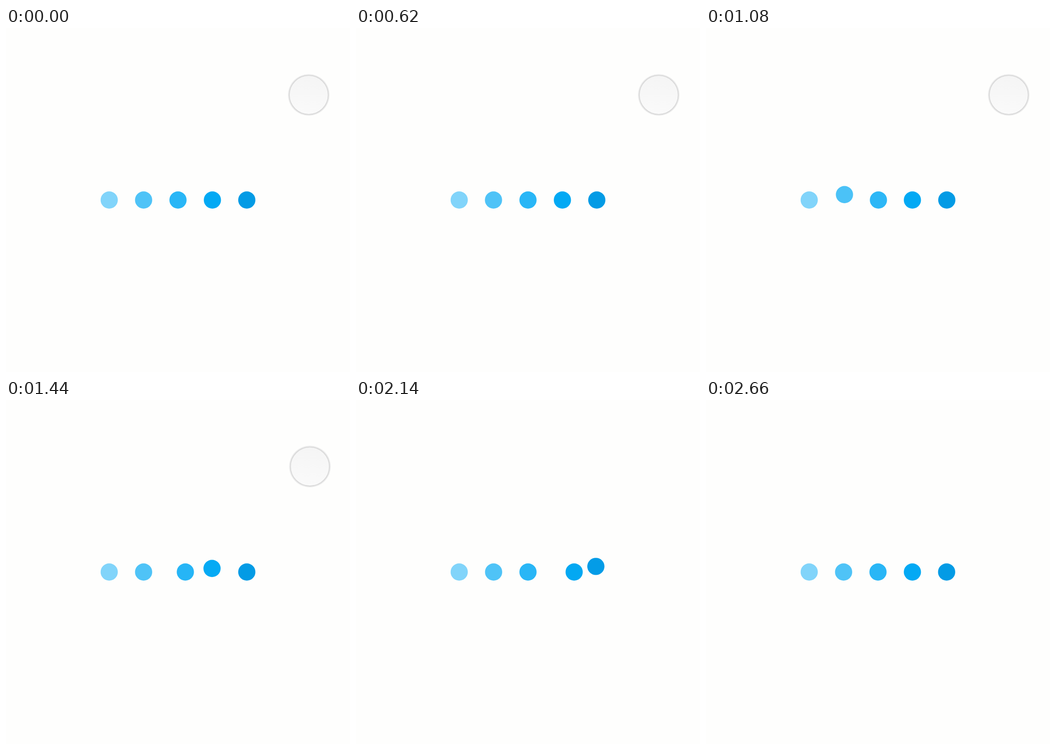
Animation of 748x748 px, one loop 2680 ms. Source, as an HTML page:

```html
<!DOCTYPE html>
<html lang="en">
<head>
<meta charset="utf-8">
<title>Swapping dots</title>
<style>
  html, body { margin: 0; width: 100%; height: 100%; overflow: hidden; background: #fefefd; }
  svg { display: block; width: 100%; height: 100%; }
</style>
</head>
<body>
<svg viewBox="0 0 748 748">
  <defs>
    <linearGradient id="glass" x1="0" y1="0" x2="0" y2="1">
      <stop offset="0" stop-color="#f5f5f5"/>
      <stop offset="1" stop-color="#fafafa"/>
    </linearGradient>
  </defs>
  <g id="dots"></g>
  <g id="pointer">
    <circle r="45.3" fill="#f0f0f0"/>
    <circle r="44" fill="#e4e4e4"/>
    <circle r="42.2" fill="url(#glass)" stroke="#d8d8d8" stroke-width="1.6"/>
  </g>
</svg>
<script>
const LOOP = 2680, FIRST = 25, PERIOD = 684, SWAP = 600;
const LEFT = 224.4, GAP = 74.8, BASE = 374, RADIUS = 18.7;
const COLORS = [[129, 212, 250], [79, 195, 247], [41, 182, 246], [3, 169, 244], [3, 155, 229]];

const group = document.getElementById('dots');
const pointer = document.getElementById('pointer');
const dots = COLORS.map(() => {
  const dot = document.createElementNS('http://www.w3.org/2000/svg', 'circle');
  dot.setAttribute('r', RADIUS);
  return group.appendChild(dot);
});

const clamp = x => Math.min(1, Math.max(0, x));

// cubic-bezier(.25, .1, .25, 1)
function ease(x) {
  if (x <= 0 || x >= 1) return clamp(x);
  const curve = (a, b, s) => 3 * a * s * (1 - s) ** 2 + 3 * b * s * s * (1 - s) + s ** 3;
  let lo = 0, hi = 1;
  for (let i = 0; i < 24; i++) {
    const mid = (lo + hi) / 2;
    if (curve(0.25, 0.25, mid) < x) lo = mid; else hi = mid;
  }
  return curve(0.1, 1, lo);
}

// Underdamped spring that peaks after 232 ms
function spring(ms) {
  const w = Math.PI / 232, damp = 0.583;
  return 1 - Math.exp(-damp * w * ms) * (Math.cos(w * ms) + damp * Math.sin(w * ms));
}

function place(dot, x, y, color) {
  dot.setAttribute('cx', x.toFixed(2));
  dot.setAttribute('cy', y.toFixed(2));
  dot.setAttribute('fill', `rgb(${color.map(Math.round)})`);
}

const mix = (a, b, k) => a.map((v, i) => v + (b[i] - v) * k);
const slot = i => LEFT + GAP * i;

function draw(t) {
  dots.forEach((dot, i) => place(dot, slot(i), BASE, COLORS[i]));

  const n = Math.floor((t - FIRST) / PERIOD);
  const ms = t - FIRST - n * PERIOD;
  if (n >= 0 && n < 4 && ms < SWAP) {
    const q = ease(ms / SWAP), angle = Math.PI * q;
    const a = COLORS[n], b = COLORS[n + 1];
    place(dots[n], slot(n) + GAP * spring(ms), BASE, mix(a, b, q));
    place(dots[n + 1],
      slot(n + 0.5) + GAP / 2 * Math.cos(angle),
      BASE - GAP / 2 * Math.sin(angle), mix(b, a, q));
  }

  const k = clamp((t - 1400) / 240) ** 2;
  pointer.setAttribute('transform', `translate(${658.3 + 88 * k} ${145.5 - 29 * k})`);
  pointer.setAttribute('visibility', t < 1650 ? 'visible' : 'hidden');
}

const start = performance.now();
function tick() {
  draw((performance.now() - start) % LOOP);
  requestAnimationFrame(tick);
}
tick();
</script>
</body>
</html>
```
